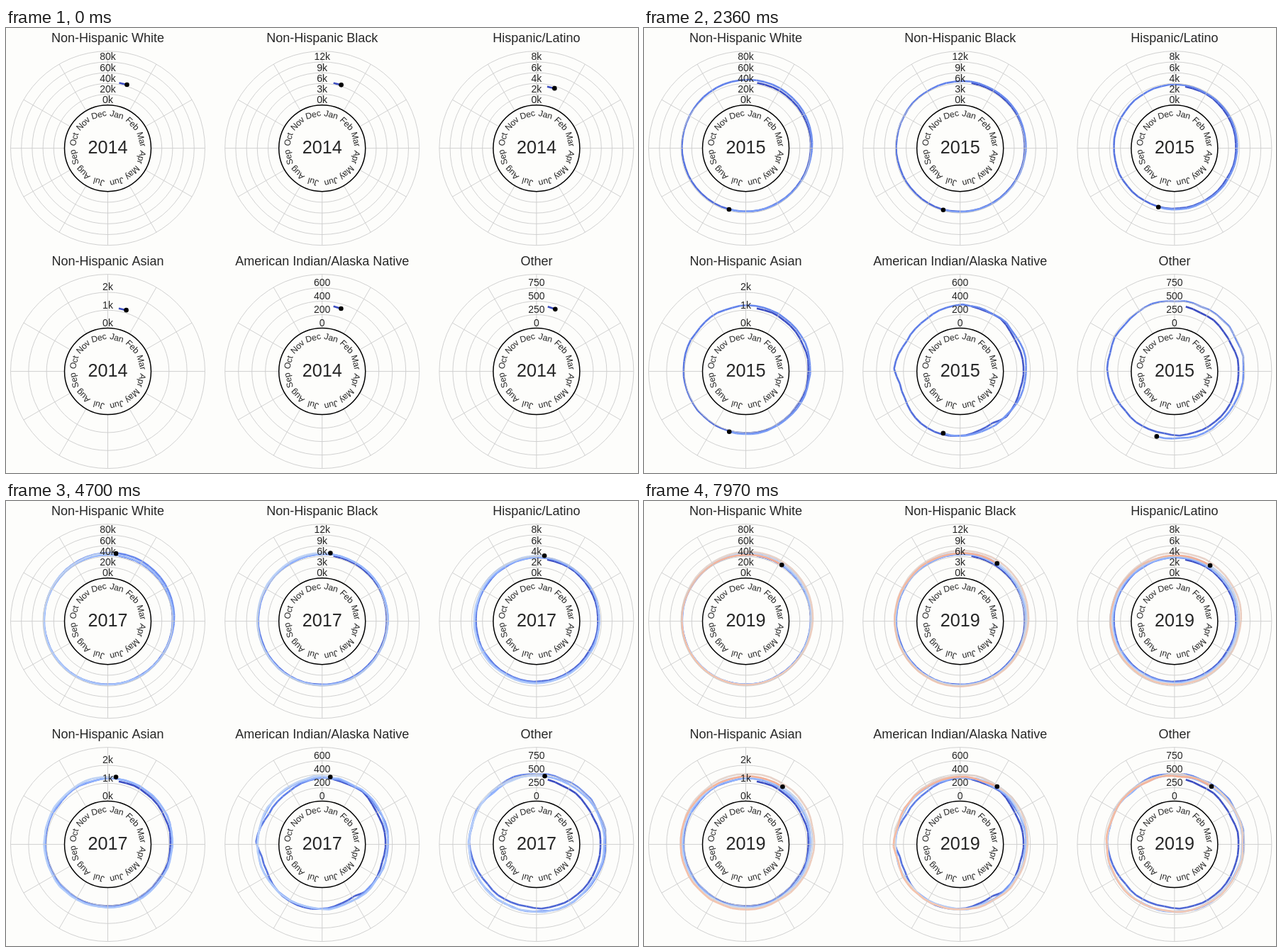
These frames come from a looping animation (891x628 px, 8000 ms). An HTML page with a canvas:

```html
<!DOCTYPE html>
<html lang="en">
<head>
<meta charset="utf-8">
<title>Weekly counts by group, 2014–2019</title>
<style>
  html, body { margin: 0; width: 100%; height: 100%; overflow: hidden; background: #fdfdfb; }
  canvas { display: block; }
</style>
</head>
<body>
<canvas id="stage" width="891" height="628"></canvas>
<script>
const ctx = document.getElementById('stage').getContext('2d');
const TAU = Math.PI * 2;
const FONT = '"Liberation Sans", Arial, sans-serif';
const INK = '#262626';
const LOOP = 8000, FPS = 33, STEPS = 264;
const INNER = 61, OUTER = 137;
const MONTHS = 'Jan Feb Mar Apr May Jun Jul Aug Sep Oct Nov Dec'.split(' ');
const COLORS = [[59, 76, 192], [98, 130, 234], [141, 176, 254], [184, 208, 249], [221, 221, 221],
  [245, 196, 173], [244, 154, 123], [222, 96, 77], [180, 4, 38]];
const COLOR_WEEKS = 380;

// base: summer radius, growth: px per year, winters: height of each winter peak,
// first: fortnightly radii of the opening year where it is irregular
const panels = [
  { title: 'Non-Hispanic White', ticks: ['0k', '20k', '40k', '60k', '80k'], rings: 5,
    base: 89.2, growth: 0.15, winters: [4.6, 8.2, 4.8, 7, 9, 4.4], noise: 0.25 },
  { title: 'Non-Hispanic Black', ticks: ['0k', '3k', '6k', '9k', '12k'], rings: 5,
    base: 89.3, growth: 0.55, winters: [3.8, 5.2, 4.8, 6.4, 9, 4.6], noise: 0.4 },
  { title: 'Hispanic/Latino', ticks: ['0k', '2k', '4k', '6k', '8k'], rings: 5,
    base: 84.5, growth: 1.2, winters: [4, 4.4, 3.4, 5, 8, 2.6], noise: 0.6 },
  { title: 'Non-Hispanic Asian', ticks: ['0k', '1k', '2k'], rings: 3,
    base: 86.6, growth: 1.1, winters: [3.8, 5.6, 4.6, 6.4, 9.6, 4], noise: 0.8 },
  { title: 'American Indian/Alaska Native', ticks: ['0', '200', '400', '600'], rings: 4,
    base: 90.3, growth: 0.35, winters: [3, 3.6, 3.4, 5, 6.5, 3.6], noise: 1.6,
    first: [92.8, 92.6, 94, 90.2, 89, 90, 89, 88, 89.8, 91.5, 86.5, 87.8, 90.3, 92, 92.5, 92, 90,
      86.5, 86.5, 93, 90, 86.5, 87, 88, 91, 93] },
  { title: 'Other', ticks: ['0', '250', '500', '750'], rings: 4,
    base: 95.2, growth: 0, winters: [0, 4.8, 2, 2.6, 3.6, 2], noise: 1.3,
    first: [92.4, 90.3, 91, 88.8, 89, 90.6, 90, 90.5, 91, 91.7, 91.5, 90.6, 90.8, 88.5, 89, 89.8,
      89, 91, 92.5, 95, 94.5, 97, 96, 98.3, 100.8, 99.8] }
];

const mix = (a, b, f) => a + (b - a) * f;

function hash(n) {
  const v = Math.sin(n * 12.9898) * 43758.5453;
  return (v - Math.floor(v)) * 2 - 1;
}

const yearsAt = week => (10 + 7 * week) / 365;

function radiusAt(panel, seed, week) {
  const jitter = panel.noise * (0.7 * hash(week + seed) + 0.5 * hash(week + seed + 1));
  const { first } = panel;
  if (first && week < 51) {
    const i = Math.floor(week / 2);
    return mix(first[i], first[i + 1] ?? first[i], week / 2 - i) + jitter * 0.3;
  }
  const years = yearsAt(week);
  const season = ((1 + Math.cos(TAU * years - 0.436)) / 2) ** 2;
  const winter = panel.winters[Math.floor(years + 0.43)];
  return panel.base + panel.growth * years + winter * season + jitter;
}

function polar(r, angle) {
  return [r * Math.sin(angle), -r * Math.cos(angle)];
}

function colorAt(week) {
  const pos = week / COLOR_WEEKS * (COLORS.length - 1);
  const i = Math.floor(pos);
  return `rgb(${COLORS[i].map((c, n) => Math.round(mix(c, COLORS[i + 1][n], pos - i)))})`;
}

panels.forEach((panel, n) => {
  panel.x = 143.5 + (n % 3) * 302.2;
  panel.y = n < 3 ? 169.7 : 484.6;
  panel.points = Array.from({ length: STEPS + 1 }, (_, week) =>
    polar(radiusAt(panel, n * 500 + 7, week), TAU * yearsAt(week)));
});
const weekColors = Array.from({ length: STEPS }, (_, week) => colorAt(week));

function text(str, x, y, size) {
  ctx.font = `${size}px ${FONT}`;
  ctx.fillText(str, x, y);
}

function circle(x, y, r) {
  ctx.beginPath();
  ctx.arc(x, y, r, 0, TAU);
}

function drawTrail(points, head) {
  ctx.lineWidth = 2.6;
  for (let i = 0; i < head; i++) {
    ctx.strokeStyle = weekColors[i];
    ctx.beginPath();
    ctx.moveTo(...points[i]);
    ctx.lineTo(...points[i + 1]);
    ctx.stroke();
  }
}

function drawGrid(rings) {
  ctx.strokeStyle = '#cccccc';
  ctx.lineWidth = 0.9;
  for (let i = 1; i <= rings; i++) {
    circle(0, 0, mix(INNER, OUTER, i / rings));
    ctx.stroke();
  }
  for (let i = 0; i < 12; i++) {
    ctx.beginPath();
    ctx.moveTo(...polar(INNER, i * TAU / 12));
    ctx.lineTo(...polar(OUTER, i * TAU / 12));
    ctx.stroke();
  }
}

function drawLabels(panel, year) {
  ctx.fillStyle = INK;
  text(panel.title, 0, -149.7, 18);
  panel.ticks.forEach((label, i) =>
    text(label, 0, -mix(INNER, OUTER, i / panel.rings) - 2.6, 14));
  text(year, 0, 7.3, 25.2);
  MONTHS.forEach((month, i) => {
    ctx.save();
    ctx.rotate((i + 0.5) * TAU / 12);
    text(month, 0, -45, 12.2);
    ctx.restore();
  });
}

function drawPanel(panel, head, year) {
  ctx.save();
  ctx.translate(panel.x, panel.y);
  drawTrail(panel.points, head);
  drawGrid(panel.rings);
  ctx.strokeStyle = '#000';
  ctx.lineWidth = 1.5;
  circle(0, 0, INNER);
  ctx.stroke();
  drawLabels(panel, year);
  ctx.fillStyle = '#000';
  circle(...panel.points[head], 3.3);
  ctx.fill();
  ctx.restore();
}

function draw(time) {
  const step = Math.min(STEPS - 1, Math.floor((time % LOOP + 5) * FPS / 1000));
  const year = new Date(Date.UTC(2014, 0, 18 + 7 * step)).getUTCFullYear();
  ctx.fillStyle = '#fdfdfb';
  ctx.fillRect(0, 0, 891, 628);
  ctx.textAlign = 'center';
  panels.forEach(panel => drawPanel(panel, step + 1, year));
}

const start = performance.now();
function tick() {
  draw(performance.now() - start);
  requestAnimationFrame(tick);
}
tick();
</script>
</body>
</html>
```
